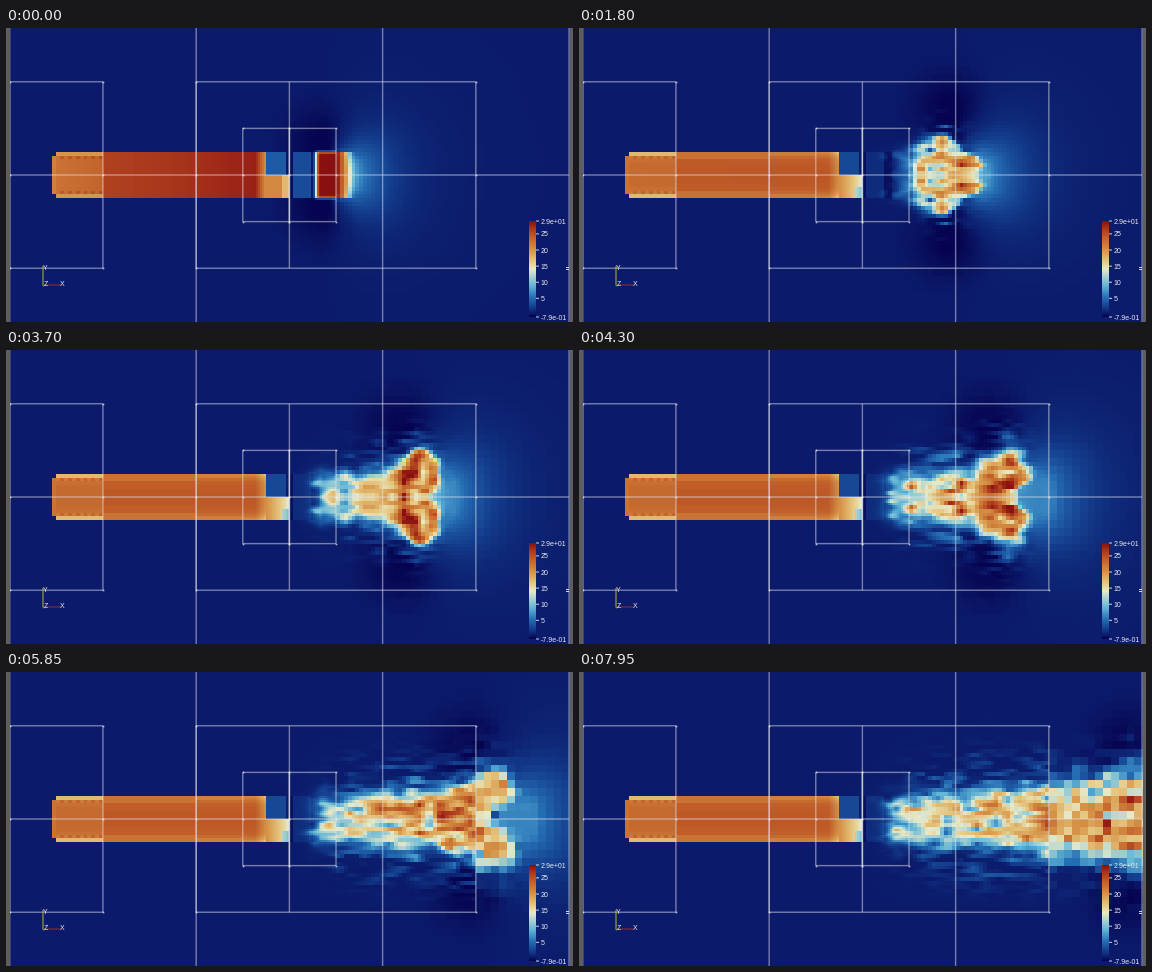
A matplotlib script for the animation above (8000 ms loop, 567 by 294 pixels).

```python
import numpy as np
import matplotlib.pyplot as plt
from matplotlib.animation import FuncAnimation
from matplotlib.colors import LinearSegmentedColormap
from matplotlib.patches import Rectangle

W, H, DPI = 567, 294, 96
PX = 72 / DPI
FRAMES, STEP = 160, 50
X0, AXIS, BLOCK = 3.7, 147.0, 93.23
VMIN, VMAX = -0.79, 29.0
HALF = BLOCK / 4  # half height of the barrel

CMAP = LinearSegmentedColormap.from_list("heat", [
    (0, "#060450"), (.035, "#0c1c6c"), (.1, "#143e8e"), (.2, "#266eb4"),
    (.32, "#5fb4d7"), (.5, "#e6eacb"), (.58, "#e6c882"), (.7, "#d69448"),
    (.83, "#c2602a"), (.93, "#a8351b"), (1, "#8a0f10")], N=512)
LUT = (CMAP(np.linspace(0, 1, 512))[:, :3] * 255).astype(np.uint8)


def build_cells():
    """Cell centres of the refined mesh and the cell index of each pixel."""
    px, py = np.meshgrid(np.arange(W) + .5, np.arange(H) + .5)
    bx, by = (px - X0) / BLOCK, np.abs(py - AXIS) / BLOCK
    size = np.full(px.shape, BLOCK / 12)
    size[(by < 1) & ((bx < 1) | ((bx > 2) & (bx < 5)))] = BLOCK / 24
    size[(by < .5) & (bx > 2.5) & (bx < 3.5)] = BLOCK / 48
    cx = X0 + (np.floor((px - X0) / size) + .5) * size
    cy = (np.floor((py - AXIS) / size) + .5) * size
    code = np.round(cx * 100) * 100000 + np.round((cy + 200) * 100)
    _, first, inverse = np.unique(code, return_index=True, return_inverse=True)
    pick = [a.ravel()[first] for a in (cx, cy, size)]
    return pick, inverse.reshape(px.shape)


(X, Y, SIZE), CELL = build_cells()
R = np.abs(Y)
COARSE = X > X0 + 5 * BLOCK
LATTICE = np.random.default_rng(7).standard_normal((32, 64, 128))


def noise(x, y, t):
    """Smooth random field, periodic in all three directions."""
    k = int(np.floor(t)) % 32
    f = t - np.floor(t)
    plane = LATTICE[k] * (1 - f) + LATTICE[(k + 1) % 32] * f
    plane = plane / np.hypot(f, 1 - f)
    ix, iy = np.floor(x).astype(int), np.floor(y).astype(int)
    fx, fy = x - ix, y - iy
    ix0, ix1, iy0, iy1 = ix % 128, (ix + 1) % 128, iy % 64, (iy + 1) % 64
    top = plane[iy0, ix0] * (1 - fx) + plane[iy0, ix1] * fx
    low = plane[iy1, ix0] * (1 - fx) + plane[iy1, ix1] * fx
    return top * (1 - fy) + low * fy


def flow_noise(t, sx, sy, speed, shift):
    """Drifting noise, mirrored about the axis at first."""
    u, clock = (X - speed * t) / sx + shift, t / .4 + shift
    a = np.clip((t - 3.8) / 2.4, 0, 1)
    mirrored = noise(u, R / sy + shift, clock)
    free = noise(u + 50, Y / sy + shift + 20, clock)
    return (mirrored * (1 - a) + free * a) / np.hypot(a, 1 - a)


def gate(d):
    return 1 / (1 + np.exp(-np.clip(d, -30, 30)))


def bell(x, centre, spread):
    return np.exp(-((x - centre) / spread) ** 2)


def head_at(t):
    return np.interp(t, [0, 1.8, 3.7, 4.9, 7.95], [345, 404, 434, 468, 600])


def backdrop(t, head, ramp):
    fade = np.exp(-t / .5)
    lobe = bell(X, head - 28 - 3 * t, 34) * bell(R, 30 + 34 * ramp + t, 34)
    base = .25 - 1.1 * lobe
    core = R < HALF
    base[(X > 283) & (X < 312) & core] = -.3
    base[(X > 287) & (X < 304) & core] = 1.1 + 2 * fade
    base[(X > 260) & (X < 279) & (Y < 0) & core] = 2.8 + 1.2 * fade
    return base


def halo(t, head):
    cx = head - 20
    dist = np.hypot(X - cx, Y) + 1e-6
    facing = np.clip((X - cx) / dist + .1, 0, 1) ** 1.3
    ahead = np.clip(dist - min(15 + 6 * t, 40), 0, None)
    return (6 + 5 * np.exp(-t)) * np.exp(-ahead / (27 + 1.5 * t)) * facing


def jet(t):
    head, ramp = head_at(t), min(t / 1.2, 1)
    burst = bell(t, 1.8, 1)
    start = 309 + 17 * burst
    base = backdrop(t, head, ramp)
    grain = flow_noise(t, 10, 5, 40, 0)
    wave = flow_noise(t, 12, 9, 30, 11)
    streak = flow_noise(t, 13, 4, 30, 5)

    # Slender body with a swelling behind the head
    swell = bell(X, head - 20 - 25 * burst, 14 + 3 * t)
    width = 21 + .06 * np.clip(X - 330, 0, None) + (22 - 1.2 * t) * ramp * swell
    width = np.where(ramp < 1, HALF + (width - HALF) * ramp, width)
    width = width * (1 + .12 * ramp * wave)

    # Hot slug turning into a mixed plume
    s = np.clip((X - start) / (head - start), 0, 1)
    slug = 29 - np.clip(X - 331, 0, 14)
    plume = 12.5 + (5 + 1.5 * min(t, 4)) * s - 5 * s ** 10 + 5.5 * grain
    blob_r = 20 * np.clip((5.7 - t) / 2, 0, 1)
    plume += 5 * bell(X, head - 30 - 18 * burst, 10) * bell(R, blob_r, 7)
    level = slug * (1 - ramp) + plume * ramp

    notch = 28 * bell(t, 5.6, 1.5) * np.clip(1 - R / 26, 0, 1)
    front = head - notch - (4 + 40 * burst) * (R / 42) ** 2 + 4 * ramp * wave
    back = start + ramp * (5 * streak + 5 * bell(R, 0, 9))
    soft = np.where(COARSE, 6, .5 + 3 * ramp)
    mask = (gate((width - R) / soft) * gate((front - X) / np.where(COARSE, 4, 2))
            * gate((X - back) / (1 + 3 * ramp)))

    # Torn edges and wisps near the muzzle
    span = gate((X - start - 26) / 10) * gate((head - 12 - X) / 8)
    beyond = np.clip(R - width, 0, None)
    fringe = 4.6 * ramp * span * np.clip(streak + .35, 0, 2)
    fringe = fringe * bell(beyond, 0, min(8 + 4 * t, 28))
    wisps = 2.5 * ramp * np.clip(streak, 0, 2) * gate((23 - R) / 2)
    wisps = wisps * gate((X - 305) / 2) * gate((start + 8 - X) / 4)

    around = base + halo(t, head) + fringe + wisps
    return around * (1 - mask) + np.clip(level, 1, VMAX) * mask


def rod(t, v):
    fade = np.exp(-t / .6)

    def settle(hot, cool):
        return hot * fade + cool * (1 - fade)

    inside = (X > 50.4) & (X < 283.4) & (R < HALF) & ((Y > 0) | (X < 260))
    tip = (X > 46.5) & (X < 50.5) & (R < 19.4)
    left = X < X0 + BLOCK
    hot = np.where(left, 22.5 + (X - 50) / 40, 26 + (X - 97) / 75)
    val = settle(hot, 24.4 - 4 * (R / HALF) ** 4 - 1.2 * left)

    val = np.where(left & (R > 19.4), settle(20, 17.5), val)
    odd = np.floor((X - X0) / SIZE) % 2 == 1
    val += 1.6 * (left & (R > 15.5) & (R < 19.4) & odd & (X > 52))

    val -= np.clip((X - 250) / 10, 0, 1) * settle(8, 4)
    foot = settle(np.where(X > 275.5, 17.5, 21),
                  20.5 - (X - 260) / 3.5 - 4 * ((X > 275.5) & (R > 12)))
    val = np.where(X > 260, foot, val)
    return np.where(tip, settle(21.5, 22.5), np.where(inside, val, v))


def picture(i):
    t = i * STEP / 1000
    v = rod(t, jet(t))
    idx = np.clip((v - VMIN) / (VMAX - VMIN), 0, 1) * 511
    return LUT[idx.astype(int)][CELL]


fig = plt.figure(figsize=(W / DPI, H / DPI), dpi=DPI)
ax = fig.add_axes([0, 0, 1, 1])
ax.axis("off")
image = ax.imshow(picture(0), extent=(0, W, H, 0), interpolation="nearest",
                  aspect="auto")


def line(x1, y1, x2, y2, color="#dfe3ee", alpha=.5, width=1.4):
    ax.plot([x1, x2], [y1, y2], color=color, alpha=alpha, lw=width * PX,
            solid_capstyle="butt", snap=False)


def label(x, y, text):
    ax.text(x, y, text, color="#e8e8ee", fontsize=7 * PX,
            va="center_baseline", family="Liberation Sans")


def mesh_box(a, b, half):
    """Outline from block a to block b, half blocks high on each side."""
    x1, x2 = X0 + a * BLOCK, X0 + b * BLOCK
    y1, y2 = AXIS - half * BLOCK, AXIS + half * BLOCK
    for y in (y1, y2):
        line(x1, y, x2, y)
    for x in (x1, x2):
        line(x, y1, x, y2)
        ax.plot([x] * 3, [y1, AXIS, y2], "s", ms=1.6 * PX, color="white",
                mew=0, alpha=.7)


line(X0, AXIS, X0 + 6 * BLOCK, AXIS)
for k in (0, 2, 4, 6):
    line(X0 + k * BLOCK, 0, X0 + k * BLOCK, H)
mesh_box(0, 1, 1)
mesh_box(2, 5, 1)
mesh_box(3, 3, .5)
mesh_box(2.5, 3.5, .5)
line(X0 + 3 * BLOCK, AXIS - BLOCK, X0 + 3 * BLOCK, AXIS + BLOCK)
for y in (239.5, 241.5):
    line(560, y, 563, y, "white", .8, 1)

for x, w in ((0, 4), (564, 3)):
    ax.add_patch(Rectangle((x, 0), w, H, color="#605e5c", lw=0, zorder=3))

# Axis triad
line(37, 238, 37, 257, "#c8c832", .9, 1)
line(37, 257, 55, 257, "#a03228", .9, 1)
ax.plot([37], [257], "o", ms=2 * PX, color="#3c9646", mew=0)
label(36.5, 239.5, "Y")
label(37.5, 255, "Z")
label(53.5, 255, "X")

# Colour scale
TOP, BOTTOM = 193, 289
strip = LUT[np.linspace(511, 0, BOTTOM - TOP).astype(int)][:, None]
ax.imshow(strip, extent=(523, 530, BOTTOM, TOP), interpolation="nearest",
          aspect="auto", zorder=4)
for value in (VMAX, 25, 20, 15, 10, 5, VMIN):
    y = BOTTOM - (value - VMIN) / (VMAX - VMIN) * (BOTTOM - TOP)
    line(530, y, 533, y, "white", .8, 1)
    label(534.5, y, f"{value:.1e}" if value in (VMIN, VMAX) else f"{value}")
ax.set_xlim(0, W)
ax.set_ylim(H, 0)


def draw(i):
    image.set_data(picture(i))
    return [image]


anim = FuncAnimation(fig, draw, frames=FRAMES, interval=STEP, repeat=True,
                     repeat_delay=0, init_func=lambda: draw(0))
plt.show()
```
